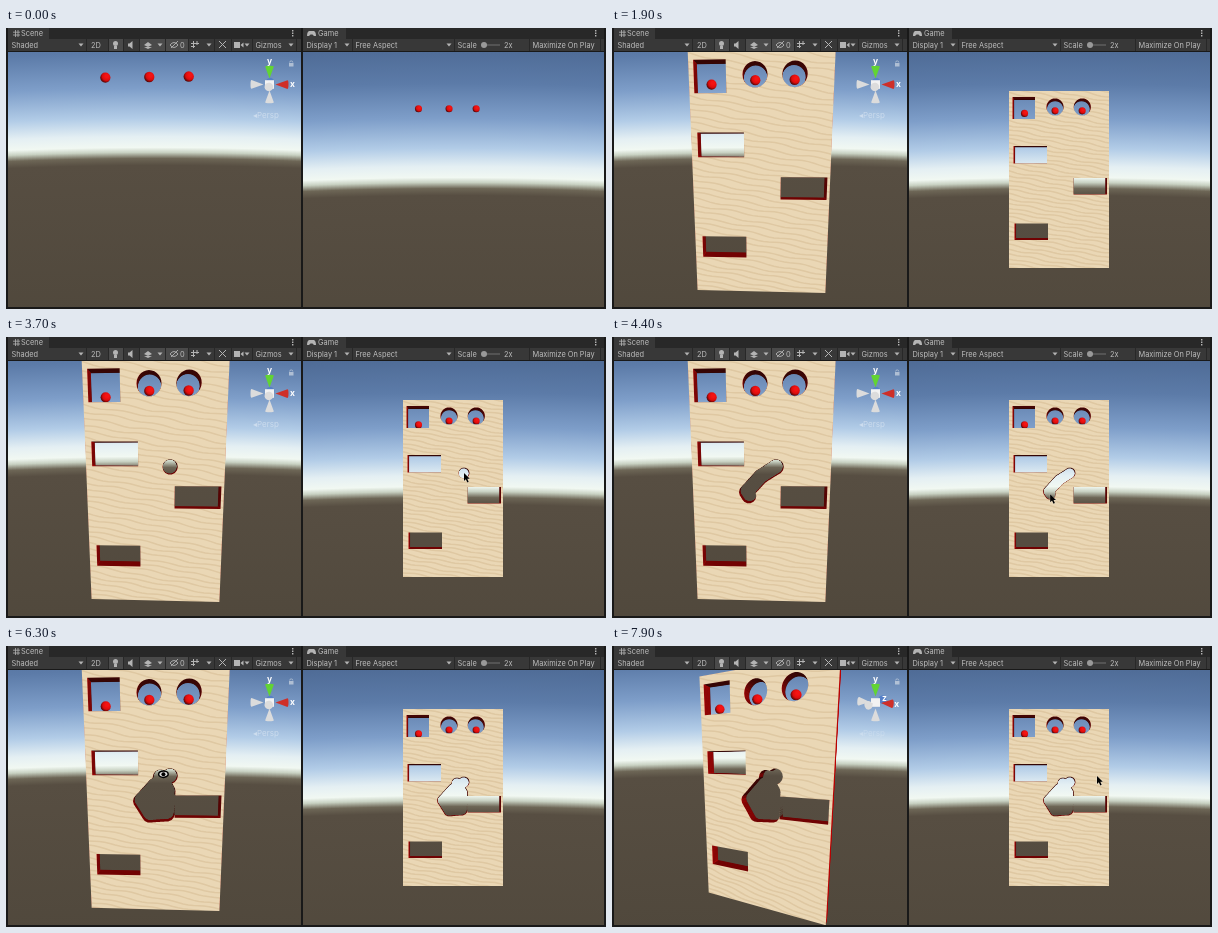
An HTML page with a canvas for the animation above (8 s loop, 600x281 px).

```html
<!DOCTYPE html>
<html lang="en">
<head>
<meta charset="utf-8">
<title>Sand board</title>
<style>
  html, body { margin: 0; width: 100%; height: 100%; overflow: hidden; background: #191919; }
  canvas, svg { position: absolute; left: 0; top: 0; width: 600px; height: 281px; }
  text { font: 7.4px Inter, "Open Sans", sans-serif; fill: #bdbdbd; }
</style>
</head>
<body>
<canvas id="stage" width="600" height="281"></canvas>
<svg viewBox="0 0 600 281">
  <path fill="#282828" d="M0 0h600v11H0z"/>
  <path fill="#383838" d="M2 0h41v23H2zM297 0h43v23h-43zM2 11h293v12H2zM297 11h301v12H297z"/>
  <g id="bar"></g>
  <path fill="#191919" d="M0 0h2v24H0zM295 0h2v24h-2zM598 0h2v24h-2zM0 23h600v1H0z"/>
  <g fill="none" stroke="#b4b4b4">
    <path d="M9.5 2v7M12 2v7M7 4.2h7M7 7h7" stroke-width=".8"/>
    <path d="M187.500 13v7M191 13v4M185 15.500h8M185 18.500h4"/>
    <path d="M213 13l7 7M220 13l-7 7"/>
    <path d="M164 17q4-5 8 0q-4 5-8 0M165 20l7-7" stroke-width=".9"/>
    <path d="M479 17h15" stroke="#707070"/>
  </g>
  <g fill="#b4b4b4">
    <path d="M303 3h5q2 1 2 5l-2 0-1.500-1.500h-2L303 8h-2q0-4 2-5z"/>
    <circle cx="109.500" cy="15.500" r="2.500"/><path d="M108 18h3v3h-3z"/>
    <path d="M122 15.500h1.500l3-2.500v8l-3-2.500H122z"/>
    <path d="M138 17l4-3 4 3-4 2zM138 19h8l-4 2z"/>
    <path d="M228 14h6v6h-6zM234.500 17l3-2.500v5z"/>
    <circle cx="478" cy="17" r="3" fill="#999"/>
  </g>
</svg>
<script>
const LOOP = 8000, START = 1700, DIG_FROM = 3700, DIG_STEP = 300, FOCAL = 221, DEPTH = 8;
const canvas = document.getElementById('stage'), ctx = canvas.getContext('2d');
const sheet = document.createElement('canvas');
sheet.width = 600; sheet.height = 281;
const pen = sheet.getContext('2d');

const text = (s, x, y) => `<text x="${x}" y="${y}">${s}</text>`;
const dots = x => [2, 4.5, 7].map(y => `<path fill="#b4b4b4" d="M${x} ${y}h1.400v1.400h-1.400z"/>`).join('');
function button(x, w, name = '', menu = false, lit = false, indent = 3.5) {
  const end = x + w;
  return (lit ? `<path fill="#4a4a4a" d="M${x} 11h${w}v12h-${w}z"/>` : '') + text(name, x + indent, 19.7) +
    (menu ? `<path fill="#b4b4b4" d="M${end - 7.5} 15.500h5l-2.500 3z"/>` : '') +
    `<path stroke="#282828" d="M${end + .5} 11v12"/>`;
}
document.getElementById('bar').innerHTML = [
  text('Scene', 15, 8.2), text('Game', 312, 8.2), dots(286), dots(589),
  button(2, 78, 'Shaded', true), button(80, 22, '2D', false, false, 5),
  button(103, 14, '', false, true), button(118, 15), button(134, 25, '', true, true),
  button(160, 22, '0', false, true, 14), button(183, 25, '', true), button(209, 16),
  button(226, 20, '', true), button(246, 44, 'Gizmos', true),
  button(297, 49, 'Display 1', true), button(346, 102, 'Free Aspect', true),
  button(448, 75, 'Scale'), text('2x', 498, 19.7), button(523, 71, 'Maximize On Play')
].join('');

// The board is modelled in game-view pixels, centred on MID.
const MID = { x: 447, y: 151.5 };
const rect = (x, y, w, h) => [[x, y], [x + w, y], [x + w, y + h], [x, y + h]];
const disc = (x, y, r, n) => Array.from({ length: n }, (_, i) => {
  const a = i / n * 2 * Math.PI;
  return [x + r * Math.cos(a), y + r * Math.sin(a)];
});
const EDGE = rect(397, 63, 100, 177);
const HOLES = [
  rect(400.5, 69, 22.5, 22), disc(443, 79, 8.6, 28), disc(470.3, 79, 8.6, 28),
  rect(401.5, 118, 33.5, 17.5), rect(461.5, 150, 33.5, 16.5), rect(402.5, 195.5, 33.5, 16.5)
];
const RIPPLES = Array.from({ length: 46 }, (_, i) => Array.from({ length: 26 }, (_, j) => [
  397 + j * 4,
  42 + i * 4.6 + j * .7 + .65 * Math.sin(j * .8 + i * 1.1) + .4 * Math.sin(j * .37 + i * 2.3)
]));
const BALLS = [{ x: 412, rest: 87 }, { x: 443, rest: 83 }, { x: 470.5, rest: 83 }];
const BALL_TOP = 79.7, BALL_SIZE = 3.6;

// Sky colours by distance below the horizon.
const SKY = [[-140, '#4b6791'], [-95, '#5c7ba8'], [-60, '#7e9ec9'], [-30, '#b2cce7'], [-12, '#e4eff3'],
  [-1, '#f1f8f2'], [4, '#c8d1c2'], [10, '#6d6656'], [17, '#574e42'], [170, '#50483c']];

const SCENE = { left: 2, width: 293, cx: 148.8, cy: 151.3, dist: 161, yaw: 0, pitch: 0, slices: 10 };
const GAME = { left: 297, width: 301, cx: 447, cy: 151.5, dist: FOCAL, yaw: 0, pitch: 0, slices: 4 };

// Pointer keys: time, x, y. Digging comes first, then a drag that orbits the scene.
const STROKE = [[458, 136], [447, 143], [436.5, 154.5], [443, 165], [456, 164], [456.5, 147], [451, 137], [448, 155]];
const DIG_TO = DIG_FROM + DIG_STEP * (STROKE.length - 1);
const GRAB = [6250, 158, 128], DRAGGED = [7200, 88, 153], RELEASE = [7400, 86, 145];
const POINTER = [
  [3150, 545, 278], ...STROKE.map(([x, y], i) => [DIG_FROM + i * DIG_STEP, x, y]),
  GRAB, DRAGGED, RELEASE, [7800, 485, 130]
];

const mix = (a, b, k) => a + (b - a) * k;
const clamp = v => Math.min(1, Math.max(0, v));
const rad = deg => deg * Math.PI / 180;

function pointerAt(t) {
  const last = POINTER.length - 1;
  let i = 0;
  while (i < last - 1 && t > POINTER[i + 1][0]) i++;
  const [a, b] = [POINTER[i], POINTER[i + 1]];
  const k = clamp((t - a[0]) / (b[0] - a[0])), s = k * k * (3 - 2 * k);
  return [mix(a[1], b[1], s), mix(a[2], b[2], s)];
}

function orbit(t) {
  const [x, y] = pointerAt(Math.min(Math.max(t, GRAB[0]), RELEASE[0]));
  return { ...SCENE, yaw: rad(2.1 + (GRAB[1] - x) * .292), pitch: rad(7.7 + (y - GRAB[2]) * .112) };
}

// Turns a vector (right, up, away) into camera space.
function turn({ yaw, pitch }, x, y, z) {
  const away = z * Math.cos(yaw) - x * Math.sin(yaw);
  return [
    x * Math.cos(yaw) + z * Math.sin(yaw),
    y * Math.cos(pitch) + away * Math.sin(pitch),
    away * Math.cos(pitch) - y * Math.sin(pitch)
  ];
}

function project(cam, x, y, z) {
  const [right, up, away] = turn(cam, x - MID.x, MID.y - y, z);
  const scale = FOCAL / (cam.dist + away);
  return [cam.cx + right * scale, cam.cy - up * scale, scale];
}

function trace(shapes, cam, z, closed = true) {
  const path = new Path2D();
  for (const shape of shapes) {
    shape.forEach(([x, y], i) => {
      const [X, Y] = project(cam, x, y, z);
      path[i ? 'lineTo' : 'moveTo'](X, Y);
    });
    if (closed) path.closePath();
  }
  return path;
}

function fillShifted(path, dx, dy, color) {
  pen.save();
  pen.translate(dx, dy);
  pen.fillStyle = color;
  pen.fill(path);
  pen.restore();
}

// One layer of the board: red inside, sand on the front.
function drawSlice(cam, holes, z) {
  pen.globalCompositeOperation = 'source-over';
  pen.clearRect(0, 0, 600, 281);
  pen.fillStyle = z ? '#b90505' : '#ead7b5';
  pen.fill(trace([EDGE], cam, z));
  const cut = trace(holes, cam, z);
  pen.globalCompositeOperation = 'source-atop';
  if (z) {
    fillShifted(cut, 1, 0, '#6b0303');
    fillShifted(cut, 0, 1, '#700303');
    fillShifted(cut, 0, -1, '#330605');
  } else {
    pen.lineWidth = 1.5;
    pen.strokeStyle = '#dfc8a2';
    pen.stroke(trace(RIPPLES, cam, 0, false));
  }
  pen.globalCompositeOperation = 'destination-out';
  pen.fill(cut);
  ctx.drawImage(sheet, 0, 0);
}

function drawSky(cam) {
  const top = SKY[0][0], span = SKY[SKY.length - 1][0] - top;
  const horizon = cam.cy - FOCAL * Math.tan(cam.pitch);
  const fade = ctx.createLinearGradient(0, top, 0, top + span);
  for (const [y, color] of SKY) fade.addColorStop((y - top) / span, color);
  ctx.fillStyle = fade;
  for (let x = 0; x < cam.width; x += 4) {
    const sag = 3 * (2 * x / cam.width - 1) ** 2 - 1;
    ctx.save();
    ctx.translate(cam.left + x, horizon + sag);
    ctx.fillRect(0, -200, 4, 400);
    ctx.restore();
  }
}

function drawBall(x, y, r) {
  const shade = ctx.createRadialGradient(x + r * .3, y - r * .3, r * .3, x + r * .2, y - r * .2, r * 1.25);
  shade.addColorStop(0, '#f51313');
  shade.addColorStop(.55, '#dc0c0c');
  shade.addColorStop(1, '#4d0505');
  ctx.fillStyle = shade;
  ctx.beginPath();
  ctx.arc(x, y, r, 0, 7);
  ctx.fill();
}

function drawView(cam, holes, t) {
  ctx.save();
  ctx.beginPath();
  ctx.rect(cam.left, 24, cam.width, 255);
  ctx.clip();
  drawSky(cam);
  const shown = t >= START, fall = clamp((t - START) / 250) ** 2;
  if (shown) for (let i = cam.slices; i > 0; i--) drawSlice(cam, holes, DEPTH * i / cam.slices);
  for (const { x, rest } of BALLS) {
    const [X, Y, scale] = project(cam, x, mix(BALL_TOP, rest, fall), DEPTH * .4);
    drawBall(X, Y, BALL_SIZE * scale);
  }
  if (shown) drawSlice(cam, holes, 0);
  ctx.restore();
}

const AXES = [
  { dir: [1, 0, 0], color: '#cf2f29', name: 'x' }, { dir: [-1, 0, 0], color: '#dcdcdc' },
  { dir: [0, 1, 0], color: '#62d433', name: 'y' }, { dir: [0, -1, 0], color: '#dcdcdc' },
  { dir: [0, 0, 1], color: '#5580c8', name: 'z' }, { dir: [0, 0, -1], color: '#dcdcdc' }
];

function drawAxis({ color, name, view: [x, y, z] }) {
  const angle = Math.atan2(-y, x), length = Math.hypot(x, y);
  ctx.save();
  ctx.rotate(angle);
  ctx.fillStyle = color;
  ctx.beginPath();
  ctx.moveTo(18 * length, -4.3);
  ctx.lineTo(6 * length, 0);
  ctx.lineTo(18 * length, 4.3);
  ctx.ellipse(18 * length, 0, Math.max(1, 4.3 * Math.abs(z)), 4.3, 0, Math.PI / 2, -Math.PI * 1.5, true);
  ctx.fill();
  ctx.restore();
  if (name && length > .4) {
    ctx.fillStyle = '#fff';
    ctx.font = 'bold 8.5px Inter, "Open Sans", sans-serif';
    ctx.fillText(name, 23 * x - 2.5, 2.5 - 23 * y);
  }
}

function drawGizmo(cam) {
  const axes = AXES.map(a => ({ ...a, view: turn(cam, ...a.dir) })).sort((a, b) => b.view[2] - a.view[2]);
  ctx.save();
  ctx.translate(263.5, 56.5);
  axes.filter(a => a.view[2] >= -.5).forEach(drawAxis);
  ctx.fillStyle = '#f2f2f2';
  ctx.fillRect(-4.5, -4.3, 9, 8.6);
  axes.filter(a => a.view[2] < -.5).forEach(drawAxis);
  ctx.restore();
  ctx.fillStyle = `rgba(255,255,255,${.42 - cam.yaw * .5})`;
  ctx.font = '8px Inter, "DejaVu Sans", sans-serif';
  ctx.fillText('◂Persp', 247, 90);
  ctx.strokeStyle = ctx.fillStyle = 'rgba(225,230,235,.6)';
  ctx.lineWidth = .8;
  ctx.fillRect(283, 35, 4.5, 3.5);
  ctx.beginPath();
  ctx.arc(285.2, 34.5, 1.6, Math.PI, 0);
  ctx.stroke();
}

function drawEye() {
  ctx.fillStyle = '#ddd';
  ctx.strokeStyle = ctx.shadowColor = '#000';
  ctx.lineWidth = 1.5;
  ctx.beginPath();
  ctx.ellipse(0, 0, 4.8, 3.2, 0, 0, 7);
  ctx.fill();
  ctx.stroke();
  ctx.fillStyle = '#000';
  ctx.beginPath();
  ctx.arc(0, 0, 2, 0, 7);
  ctx.fill();
}

function drawArrow() {
  const arrow = new Path2D('M0 0V8L1.8 6.300 3.300 9.500 4.700 8.800 3.300 5.800H5.800Z');
  ctx.strokeStyle = 'rgba(255,255,255,.5)';
  ctx.lineWidth = .7;
  ctx.stroke(arrow);
  ctx.fillStyle = '#000';
  ctx.fill(arrow);
}

function drawPointer(t) {
  if (t < POINTER[0][0]) return;
  ctx.save();
  ctx.translate(...pointerAt(t));
  if (t >= GRAB[0] && t < RELEASE[0]) drawEye();
  else drawArrow();
  ctx.restore();
}

function draw(t) {
  ctx.fillStyle = '#191919';
  ctx.fillRect(0, 0, 600, 281);
  const holes = [...HOLES], cam = orbit(t);
  for (let s = DIG_FROM; s <= Math.min(t, DIG_TO); s += 25) holes.push(disc(...pointerAt(s), 5.5, 14));
  drawView(cam, holes, t);
  drawView(GAME, holes, t);
  drawGizmo(cam);
  drawPointer(t);
}

function tick() {
  draw(performance.now() % LOOP);
  requestAnimationFrame(tick);
}
tick();
</script>
</body>
</html>
```
